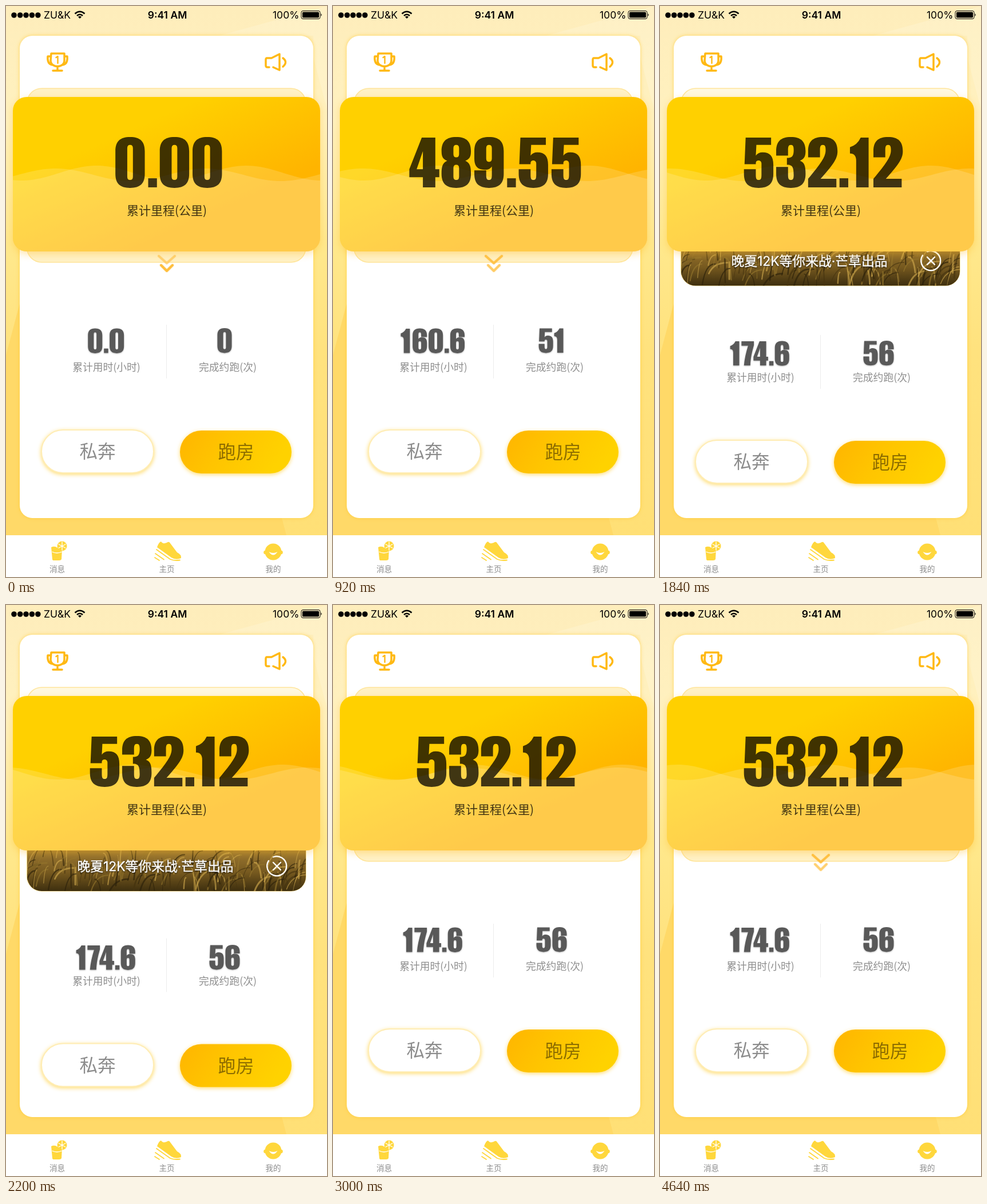
Write an HTML page that moves like this. It is 561 px wide and 998 px high and loops after 4.68 s.

```html
<!DOCTYPE html>
<html lang="zh-CN">
<head>
<meta charset="utf-8">
<style>
html, body { margin: 0; width: 100%; height: 100%; overflow: hidden; }
svg { display: block; width: 100%; height: 100%; font-family: "Noto Sans CJK SC", "Noto Sans CJK", sans-serif; }
.status { font: 17.5px Inter, sans-serif; }
.mid { text-anchor: middle; }
.label { font-size: 17.8px; fill: #8e8e8e; }
.tab { font-size: 13.5px; fill: #8c8c8c; }
.action { font-size: 31.5px; }
.line { fill: none; stroke-linecap: round; stroke-linejoin: round; }
.icon { stroke: #ffb914; stroke-width: 3.5; }
.sheet { filter: drop-shadow(0 0 3px rgba(255, 200, 40, .65)); }
.card { filter: drop-shadow(0 4px 7px rgba(255, 185, 30, .4)); }
.glow { filter: drop-shadow(0 2px 3.5px rgba(255, 205, 50, .7)); }
.stat { fill: #595959; filter: drop-shadow(0 2px 2px rgba(0, 0, 0, .28)); }
.title {
  font: 22.8px Inter, "Noto Sans CJK SC", "Noto Sans CJK", sans-serif;
  fill: #fff; stroke: #fff; stroke-width: .4;
  filter: drop-shadow(0 1px 1px rgba(0, 0, 0, .7));
}
.chevron { stroke: #ffbe3c; stroke-width: 4; filter: drop-shadow(0 0 1px #ffd98a); }
</style>
</head>
<body>
<svg viewBox="0 0 561 998">
  <defs>
    <linearGradient id="sky" x2="0" y2="1">
      <stop stop-color="#feedbb"/><stop offset=".2" stop-color="#fff1bf"/>
      <stop offset=".42" stop-color="#ffe88c"/><stop offset=".6" stop-color="#ffe27e"/>
      <stop offset="1" stop-color="#ffdf74"/>
    </linearGradient>
    <linearGradient id="gold" gradientUnits="userSpaceOnUse" x1="220" y1="150" x2="340" y2="420">
      <stop offset=".2" stop-color="#ffd000"/><stop offset=".85" stop-color="#ffb400"/>
    </linearGradient>
    <linearGradient id="pill" y2=".25">
      <stop stop-color="#ffb500"/><stop offset=".45" stop-color="#ffc400"/><stop offset="1" stop-color="#ffd200"/>
    </linearGradient>
    <linearGradient id="field" x2="0" y2="1">
      <stop offset=".5" stop-color="#a98238"/><stop offset=".8" stop-color="#76591f"/><stop offset="1" stop-color="#3a2c0e"/>
    </linearGradient>
    <clipPath id="panelClip"><rect class="panel" x="37" y="144" width="487" rx="25"/></clipPath>
    <clipPath id="cardClip"><rect x="12" y="159" width="537" height="270" rx="24"/></clipPath>
  </defs>

  <rect width="561" height="998" fill="url(#sky)"/>
  <path d="M372 52L561 0V180L537 90V52Z" fill="#fff" opacity=".15"/>
  <path d="M24 520L0 610V925H490L478 880H24Z" fill="#ffd968"/>

  <g class="status">
    <circle cx="14" cy="16" r="4.8"/><circle cx="24.7" cy="16" r="4.8"/><circle cx="35" cy="16" r="4.8"/>
    <circle cx="45.4" cy="16" r="4.8"/><circle cx="55.8" cy="16" r="4.8"/>
    <text x="66" y="22">ZU&amp;K</text>
    <path class="line" stroke="#000" stroke-width="2.6" style="stroke-linecap:butt" d="M120.500 13.500Q129 6 137.500 13.500M124 17Q129 12.500 134 17"/>
    <path d="M129 22L126 19Q129 16.500 132 19Z"/>
    <text class="mid" x="282" y="22" font-weight="600">9:41 AM</text>
    <text x="466" y="22">100%</text>
    <rect x="516" y="8.500" width="33" height="14" rx="3" fill="none" stroke="#000"/>
    <rect x="518" y="10.500" width="29" height="10" rx="1.500"/>
    <path d="M550.500 13Q553 15.500 550.500 18Z"/>
  </g>

  <rect class="sheet" x="24" y="52" width="513" height="843" rx="22" fill="#fff"/>
  <g class="line icon">
    <path d="M79 83H102V95C102 109 78 109 78 95ZM78 88H73C72 98 75 102 81 103M102 88H107C108 98 105 102 99 103M90 106V112M82 113H98"/>
    <path stroke-width="2.400" d="M87.500 90L90.500 88V100"/>
    <path d="M464 91H456Q454 91 454 94V104Q454 107 457 107H460M464 91L478 84V112L467 107M484 91Q493 98 484 106"/>
  </g>

  <rect class="panel" id="panel" x="36.500" y="144" width="487.500" rx="26" fill="#fff1c6" stroke="#ffe59a" stroke-width="1.500"/>
  <g clip-path="url(#panelClip)">
    <g id="photo">
      <rect x="36" y="330" width="490" height="172" fill="url(#field)"/>
      <g id="wheat" class="line"></g>
      <text class="title mid" x="261" y="465">晚夏12K等你来战·芒草出品</text>
      <path class="line" stroke="#fff" stroke-width="2.400" d="M459 447A17 17 0 1 0 467 440.500M467 450L480 463M480 450L467 463"/>
    </g>
  </g>
  <g id="chevrons" class="line chevron">
    <path d="M267 437L281 449.500L295 437"/><path d="M271 453L281 463L291 453"/>
  </g>

  <rect class="card" x="12" y="159" width="537" height="270" rx="24" fill="url(#gold)"/>
  <g clip-path="url(#cardClip)" fill="#fff" fill-opacity=".155"><path id="backWave"/><path id="frontWave"/></g>
  <g id="distance" fill-opacity=".75"></g>
  <text class="mid" x="281" y="365" font-size="21" fill-opacity=".75">累计里程(公里)</text>

  <g id="hours" class="stat"></g>
  <g id="runs" class="stat"></g>
  <g id="lower">
    <path d="M280.500 557V651" stroke="#ececec"/>
    <text class="label mid" x="175.500" y="638">累计用时(小时)</text>
    <text class="label mid" x="387.500" y="638">完成约跑(次)</text>
    <rect class="glow" x="62" y="741" width="196" height="75" rx="37.500" fill="#fff" stroke="#ffedb5" stroke-width="2"/>
    <text class="action mid" x="160" y="790" fill="#8c8c8c">私奔</text>
    <rect class="glow" x="304" y="742" width="195" height="75" rx="37.500" fill="url(#pill)"/>
    <text class="action mid" x="402" y="791" fill-opacity=".45">跑房</text>
  </g>

  <rect y="925" width="561" height="73" fill="#fff"/>
  <g fill="#ffd73c">
    <path d="M79 946Q85 943 90 947T98 949L97 967Q96 969 93 969H84Q81 969 81 967Z"/>
    <circle cx="98" cy="944" r="8.500"/>
    <path d="M98 936.500V951.500M91.500 940.500L104.500 947.500M91.500 947.500L104.500 940.500M80.500 954Q89 958 97.500 954" fill="none" stroke="#fff" stroke-width="1.300"/>
    <path d="M264 946Q267 937 271 936Q274 941 281 938Q285 935 287 939L299 955Q307 959 306 965Q297 969 289 964Z"/>
    <path class="line" stroke="#ffd73c" stroke-width="1.800" d="M263 950L287 967Q294 970 304 968.500M261 957L276 967.500M260 964L268 969"/>
    <ellipse cx="467" cy="954" rx="14.500" ry="14.500"/><circle cx="453.500" cy="955" r="3.300"/><circle cx="480.500" cy="955" r="3.300"/>
    <path fill="#fff" d="M459.500 954Q467 958 474.500 954Q467 965 459.500 954Z"/>
  </g>
  <g class="tab mid">
    <text x="89.500" y="989">消息</text><text x="281" y="989">主页</text><text x="467" y="989">我的</text>
  </g>
</svg>
<script>
const LOOP = 4680, STEP = 40;
const $ = id => document.getElementById(id);

// Heavy condensed numerals, 52 wide and 90 high, built from shared curves.
const dome = 'C0 8 8 0 26 0S52 8 52 25';
const bowl = 'C52 82 44 90 26 90S0 82 0 65';
const lid = 'c0-6-1-9-5-9s-5 3-5 9';
const cup = 'c0 6 1 9 5 9s5-3 5-9';
const slot = (top, bottom) => `M21 ${top + 6}q0-6 5-6t5 6V${bottom - 6}q0 6-5 6t-5-6Z`;

// character: [advance, left bearing, outline]
const glyphs = {
  0: [58, 3, `M0 25${dome}V65${bowl}Z` + slot(14, 76)],
  1: [41, 1, 'M33 1V89H11V42Q11 29 0 29V18Q13 14 19 1Z'],
  2: [54, 1.5, `M0 36V25${dome}C52 37 47 46 22 74H50V89H0V74C25 44 31 34 31 23${lid}V36Z`],
  3: [57, 2, `M0 33V25${dome}C52 35 49 39 42 42C50 45 52 51 52 65${bowl}V53H21V67${cup}C31 52 28 49 19 49V37C28 37 31 34 31 23${lid}V33Z`],
  4: [55, 1, 'M22 1H46V57H53V71H46V89H24V71H0V57ZM24 57V25L13 57Z'],
  5: [58, 3, `M3 1H48V14H22L21 33Q25 27 33 27C46 27 52 34 52 49V65${bowl}V57H21V67${cup}V47C31 40 21 40 21 46V48H1Z`],
  6: [58, 3, `M0 25${dome}V31H31V23${lid}V38Q25 32 33 32C46 32 52 38 52 52V65${bowl}Z` + slot(46, 76)],
  7: [43.5, 1, 'M0 1H45V15C37 43 33 63 32 89H9C11 65 16 43 24 17H0Z'],
  8: [58, 3, `M0 25${dome}C52 36 49 39 42 42C50 46 52 51 52 65${bowl}C0 51 2 46 10 42C3 39 0 36 0 25Z` + slot(14, 36) + slot(49, 76)],
  '.': [20.5, 3, 'M0 73H15.500V89H0Z']
};
glyphs[9] = glyphs[6];

function drawNumber(id, text, centerX, top, scale) {
  let x = 0, paths = '';
  for (const char of text) {
    const [advance, bearing, outline] = glyphs[char];
    const left = x + bearing;
    const place = char === '9' ? `translate(${left + 52} 90) rotate(180)` : `translate(${left})`;
    paths += `<path fill-rule="evenodd" transform="${place}" d="${outline}"/>`;
    x += advance;
  }
  const group = $(id);
  group.innerHTML = paths;
  group.setAttribute('aria-label', text);
  group.setAttribute('transform', `translate(${centerX - x * scale / 2} ${top}) scale(${scale})`);
}

function sowWheat() {
  let seed = 7;
  const random = () => (seed = seed * 16807 % 2147483647) / 2147483647;
  const tones = ['#cda64c', '#2c210a', '#94752c', '#483510'];
  let stalks = '';
  for (let i = 0; i < 170; i++) {
    const x = 20 + random() * 500, y = 415 + random() * 65;
    const lean = random() * 50 - 12, height = 18 + random() * 26;
    stalks += `<path stroke="${tones[i % 4]}" stroke-width="${1 + random() * 2}" opacity=".65"
      d="M${x} ${y + height}Q${x + lean / 4} ${y} ${x + lean} ${y}"/>`;
  }
  $('wheat').innerHTML = stalks;
}

function drawWave(id, crestX, level, height) {
  let d = 'M12 429';
  for (let x = 12; x <= 552; x += 6) {
    d += `L${x} ${level - height * Math.cos((x - crestX) / 262 * 2 * Math.PI)}`;
  }
  $(id).setAttribute('d', d + 'V429Z');
}

const ease = (t, start, duration, power = 2) =>
  1 - (1 - Math.min(1, Math.max(0, (t - start) / duration))) ** power;
const openness = (t, power) => ease(t, 1564, 600, power) - ease(t, 2740, 260, power);
const shiftY = (id, y) => $(id).setAttribute('transform', `translate(0 ${y})`);

function draw(now) {
  const t = Math.floor(now % LOOP / STEP) * STEP;
  const count = Math.min(1, t / 1000);
  const shift = openness(t, 2), reveal = openness(t, 2.5);

  drawNumber('distance', (532.12 * count).toFixed(2), 284.3, 229, .988);
  drawNumber('hours', (174.6 * count).toFixed(1), 174.7, 563.5 + 31 * shift, .482);
  drawNumber('runs', String(Math.floor(56 * count)), 382, 563 + 31 * shift, .482);
  shiftY('lower', 25.5 * shift);

  for (const rect of document.querySelectorAll('.panel')) rect.setAttribute('height', 304 + 52 * reveal);
  $('panel').setAttribute('fill', reveal > .1 ? '#fff8e0' : '#fff1c6');
  shiftY('photo', 52 * (reveal - 1));
  $('photo').setAttribute('opacity', Math.min(1, reveal * 3));

  drawWave('backWave', 158 + t * .029, 292, 13);
  drawWave('frontWave', 87 - t * .038, 295, 11);

  const [upper, lower] = $('chevrons').children;
  const pulse = .5 + .5 * Math.cos((t - 650) / 1400 * 2 * Math.PI);
  upper.setAttribute('opacity', .5 + .5 * pulse);
  lower.setAttribute('opacity', 1 - .5 * pulse);
  $('chevrons').setAttribute('opacity', 1 - ease(t, 1560, 80) + ease(t, 3040, 300));

  requestAnimationFrame(draw);
}

sowWheat();
draw(performance.now());
</script>
</body>
</html>
```
